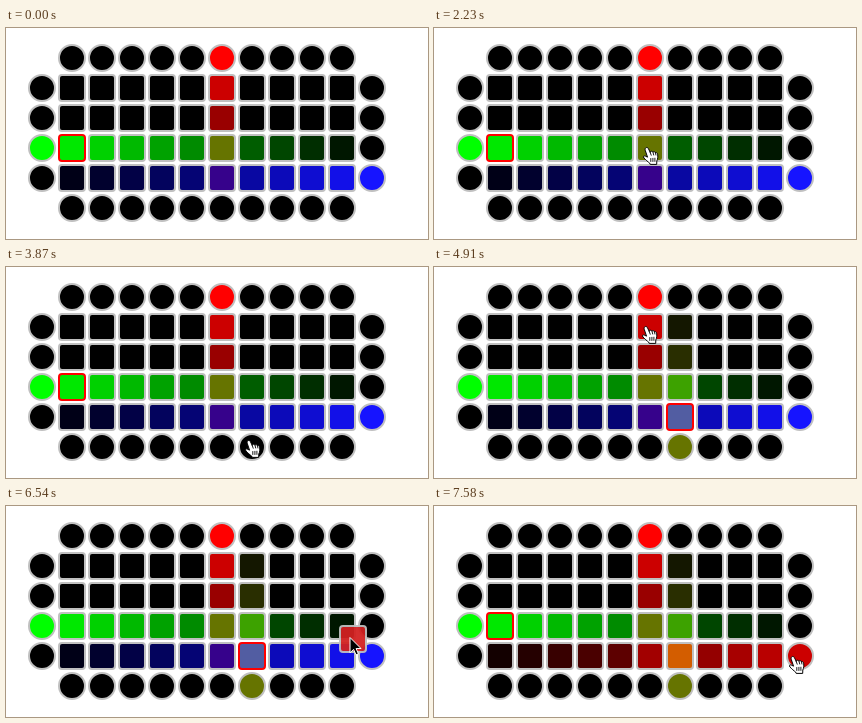
Animation, 422 px wide and 211 px high, one loop 8 s. Source, as an HTML page:

```html
<!DOCTYPE html>
<html lang="en">
<head>
<meta charset="utf-8">
<title>Color sources</title>
<style>
  html, body { margin: 0; width: 100%; height: 100%; overflow: hidden; background: #fff; }
  #stage { position: relative; width: 422px; height: 211px; overflow: hidden; }
  .cell {
    position: absolute; box-sizing: border-box; width: 28px; height: 28px;
    border: 2px solid silver; border-radius: 4px; background: #000;
  }
  .source { border-radius: 50%; }
  .closest { border-color: red; }
  #ghost { opacity: .94; }
  #pointer { position: absolute; left: 0; top: 0; }
</style>
</head>
<body>
<div id="stage"></div>
<script>
const COLS = 10, ROWS = 4, PITCH = 30, LEFT = 52, TOP = 46;
const LOOP = 8000, TICK = 148.5;
const stage = document.getElementById('stage');

function addCell(col, row, kind = '') {
  const el = document.createElement('div');
  el.className = 'cell ' + kind;
  el.style.left = LEFT + col * PITCH + 'px';
  el.style.top = TOP + row * PITCH + 'px';
  stage.append(el);
  return el;
}

// Strong blues are shown slightly lighter, as on a wide-gamut screen.
function css([r, g, b]) {
  const tint = 22 * (Math.max(0, b - r - g) / 255) ** 2;
  return `rgb(${[r + tint, g + tint * .9, b].map(Math.round)})`;
}

const lighten = rgb => rgb.map(v => v + (255 - v) * .13);

// Sources sit at index -1 and at COLS or ROWS; tiles lie between them.
const sources = {}, tiles = [];
for (let row = -1; row <= ROWS; row++) {
  for (let col = -1; col <= COLS; col++) {
    const edgeX = col < 0 || col === COLS, edgeY = row < 0 || row === ROWS;
    if (edgeX && edgeY) continue;
    if (edgeX || edgeY) sources[[col, row]] = addCell(col, row, 'source');
    else tiles.push({ col, row, el: addCell(col, row) });
  }
}

// Light fades linearly along its row or column; sums are scaled to fit 255.
function mix(lit, col, row) {
  const sum = [0, 0, 0];
  for (const key in lit) {
    const [c, r] = key.split(',').map(Number);
    if (c !== col && r !== row) continue;
    const share = c === col
      ? 1 - Math.abs(r - row) / (ROWS + 1)
      : 1 - Math.abs(c - col) / (COLS + 1);
    lit[key].forEach((v, i) => sum[i] += v * share);
  }
  const scale = 255 / Math.max(255, ...sum);
  return sum.map(v => v * scale);
}

const start = { '5,-1': [255, 0, 0], '-1,2': [0, 255, 0], '10,3': [0, 0, 255] };
const olive = mix(start, 5, 2), red = mix(start, 5, 0);
const withOlive = { ...start, '6,4': olive };
const boards = [
  { from: 0, lit: start, closest: '0,2' },
  { from: 27, lit: withOlive, closest: '6,3' },
  { from: 50, lit: { ...withOlive, '10,3': red }, closest: '0,2' }
];

let shown;
function showBoard(board) {
  if (board === shown) return;
  shown = board;
  const { lit, closest } = board;
  for (const key in sources) sources[key].style.background = css(lit[key] || [0, 0, 0]);
  for (const { col, row, el } of tiles) {
    el.style.background = css(mix(lit, col, row));
    el.classList.toggle('closest', `${col},${row}` === closest);
  }
}

const ghost = addCell(0, 0);
ghost.id = 'ghost';
stage.insertAdjacentHTML('beforeend', `
  <svg id="pointer" width="422" height="211">
    <g id="hand" stroke="#000" stroke-linecap="round" stroke-linejoin="round">
      <path fill="#fff" d="M-2.9 2.8C-3.4 .4 -.6 -.4 .4 1.6L2.2 5.4C2.2 3.9 4.4 3.8 5 5.2C5.4 4.2 7 4.4 7.5 5.8C8.2 5.2 9.3 5.7 9.6 7.2C10.1 9.8 9.8 11.8 8.8 14L8.7 17.4H2.2L1.6 16C0 15 -2.4 12.6 -4.1 11C-5.1 9.4 -3.9 8.2 -2.5 9.2L-.8 10Z"/>
      <path fill="none" stroke-width=".9" d="M2.2 5.4L3.2 8.2M5 5.2L5.7 8M7.5 5.8L7.9 8M2.8 11.5V14.5M4.9 11.3V14.5M6.9 11.2V14.4"/>
    </g>
    <path id="arrow" fill="#000" stroke="#fff" d="M0 1.5V16.8L3.6 13.4L6 18.8L8.4 17.8L6.1 12.5H11Z"/>
    <g id="plus">
      <circle cx="10" cy="23" r="9" fill="#159a15" stroke="#fff" stroke-width="1.2"/>
      <path d="M5.3 23H14.7M10 18.3V27.7" stroke="#fff" stroke-width="2.6"/>
    </g>
  </svg>`);
const [hand, arrow, plus] = ['hand', 'arrow', 'plus'].map(id => document.getElementById(id));

// The pointer eases to each point in turn and rests in between.
const entry = { x: 238, y: 222 };
const moves = [
  { from: 0, to: 8, x: 224, y: 128 },
  { from: 9, to: 11, x: 223, y: 124 },
  { from: 12, to: 15, x: 214, y: 119 },
  { from: 15, to: 20, x: 243, y: 167 },
  { from: 20, to: 23, x: 244, y: 173 },
  { from: 28, to: 33, x: 213, y: 59 },
  { from: 40, to: 44, x: 344, y: 130 },
  { from: 44, to: 48, x: 358, y: 148 },
  { from: 48, to: 51, x: 360, y: 150 }
];
const drags = [
  { from: 16, to: 26, color: olive },
  { from: 41, to: 49, color: red }
];

function pointerAt(tick) {
  let { x, y } = entry;
  for (const move of moves) {
    const u = Math.min(1, Math.max(0, (tick - move.from) / (move.to - move.from)));
    const eased = u * u * (3 - 2 * u);
    x += (move.x - x) * eased;
    y += (move.y - y) * eased;
  }
  return [Math.round(x), Math.round(y)];
}

function place(el, visible, x, y) {
  el.style.display = visible ? '' : 'none';
  el.setAttribute('transform', `translate(${x} ${y})`);
}

function draw() {
  const tick = Math.floor(performance.now() % LOOP / TICK);
  showBoard(boards.findLast(b => tick >= b.from));

  const [x, y] = pointerAt(tick);
  const drag = drags.find(d => tick >= d.from && tick < d.to);
  const onBoard = y < TOP + (ROWS + 1) * PITCH;
  const onSource = x >= LEFT + COLS * PITCH || y >= TOP + ROWS * PITCH;
  place(hand, !drag && onBoard, x, y);
  place(arrow, drag || !onBoard, x, y);
  place(plus, drag && onSource, x, y);

  ghost.style.display = drag ? '' : 'none';
  if (drag) {
    ghost.style.left = x - 11 + 'px';
    ghost.style.top = y - 11 + 'px';
    ghost.style.background = css(lighten(drag.color));
  }
  requestAnimationFrame(draw);
}
draw();
</script>
</body>
</html>
```
